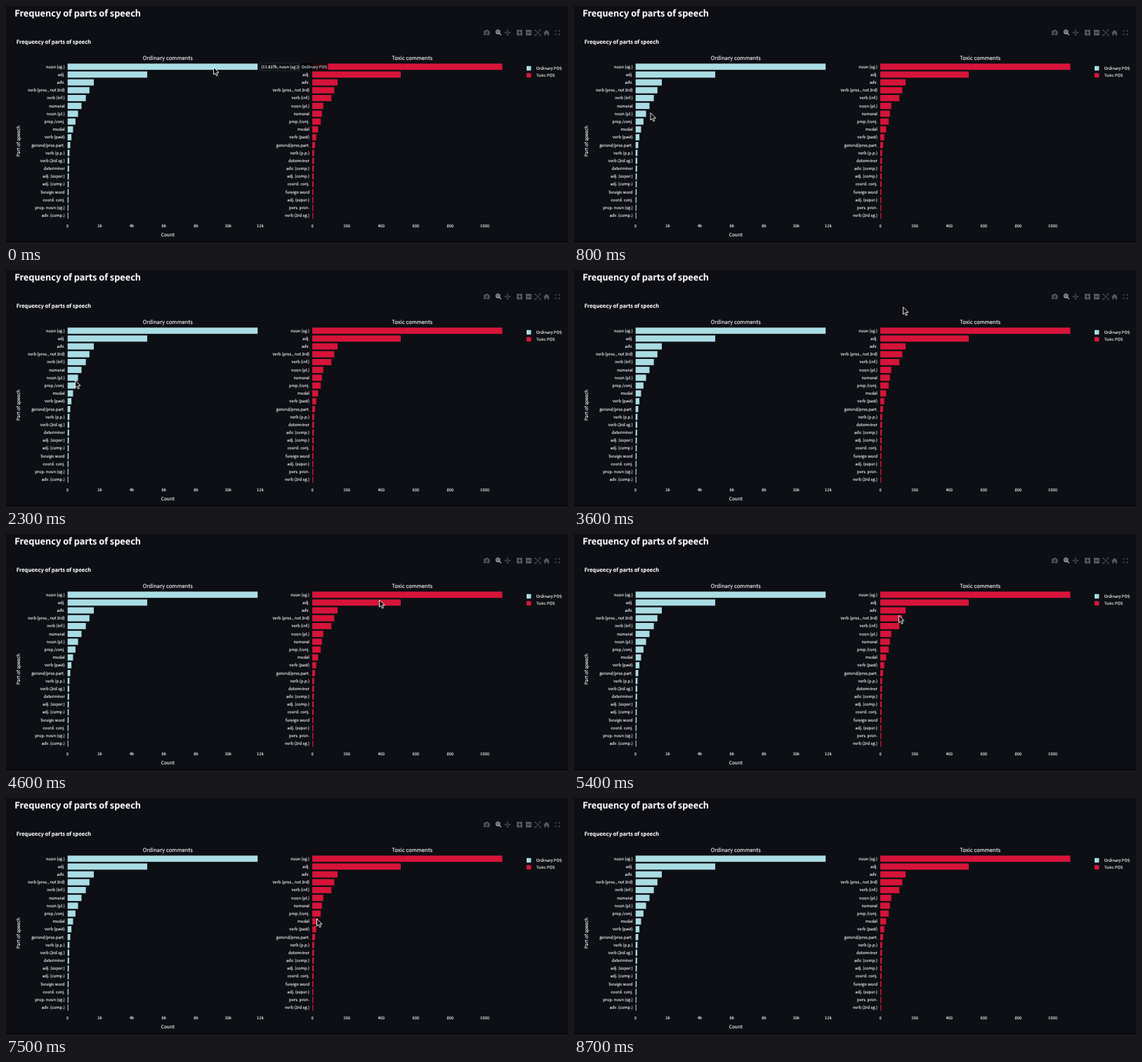
An HTML page for the animation above (9.3 s loop, 800 px wide and 337 px high).

```html
<!DOCTYPE html>
<html lang="en">
<head>
<meta charset="utf-8">
<title>Frequency of parts of speech</title>
<style>
  html, body { margin: 0; width: 100%; height: 100%; overflow: hidden; background: #0d0f14; }
  svg { display: block; width: 100%; height: 100%; }
  text {
    font: 5.77px "Noto Sans CJK JP", "Noto Sans CJK SC", "Open Sans", sans-serif;
    color: #fafafa; fill: currentColor; stroke: currentColor; stroke-width: .12;
    text-rendering: geometricPrecision;
  }
  .mid { text-anchor: middle; }
  .end { text-anchor: end; }
  #tools { fill: none; stroke: #55575d; stroke-width: 1.1; }
  #tools .solid { fill: #55575d; stroke: none; }
  #tools .cut { stroke: #0d0f14; }
</style>
</head>
<body>
<svg id="stage" viewBox="0 0 800 337">
  <rect width="800" height="337" fill="#0d0f14"/>
  <rect y="336" width="800" height="1" fill="#000"/>
  <g id="chart"></g>
  <g id="tools">
    <path class="solid" d="M680 35.5h2l1-1.5h3l1 1.5h1.5v6H680z"/>
    <circle class="cut" cx="684.3" cy="38.2" r="1.5"/>
    <g stroke="#b9babe"><circle cx="700.3" cy="37" r="2.7"/><path d="M702.3 39l2.8 2.8M698.9 37h2.8M700.3 35.6v2.8"/></g>
    <path stroke-width=".9" d="M710 38h8M714 34v8M711.3 36.7L710 38l1.3 1.3M716.7 36.7L718 38l-1.3 1.3M712.7 35.3L714 34l1.3 1.3M712.7 40.7L714 42l1.3-1.3"/>
    <path class="solid" d="M727 34h8v8h-8zM740 34h8v8h-8z"/>
    <path class="cut" d="M728.5 38h5M731 35.5v5M741.5 38h5"/>
    <path stroke-width=".9" d="M753 36v-2h2M759 34h2v2M761 40v2h-2M755 42h-2v-2M754 35l6 6M760 35l-6 6"/>
    <path class="solid" d="M765 38.3l4.5-4.3 4.5 4.3h-1.2V42h-2.2v-2.5h-2.2V42h-2.2v-3.7z"/>
    <path stroke-width=".9" d="M782 37v-2h2M786 35h2v2M788 39v2h-2M784 41h-2v-2"/>
  </g>
  <g id="tip"></g>
  <path id="cursor" d="M0 0V10.5L2.4 8.3 4 12.2 5.8 11.4 4.2 7.6H7.5Z" fill="#000" stroke="#fff" stroke-width=".9"/>
</svg>
<script>
const $ = id => document.getElementById(id);
const BLUE = '#a9dce3', RED = '#d6143a', BG = '#0d0f14';
const TOP = 86.7, ROW = 11.19, BAR = 8.9, ROWS = 20;

function add(parent, tag, attrs, content = '') {
  const el = document.createElementNS('http://www.w3.org/2000/svg', tag);
  for (const k in attrs) el.setAttribute(k, attrs[k]);
  el.textContent = content;
  return parent.appendChild(el);
}
const label = (parent, x, y, str, cls = '', style = '') =>
  add(parent, 'text', { x, y, class: cls, style }, str);
const box = (parent, x, y, width, height, fill) =>
  add(parent, 'rect', { x, y, width, height, fill });

// Finds the stretch of ascending knots that holds v
function segment(knots, v) {
  const i = Math.max(1, knots.findIndex(k => k >= v));
  return [i, (v - knots[i - 1]) / (knots[i] - knots[i - 1])];
}

// Counts fall off geometrically between these rows
const KNOTS = [0, 1, 2, 4, 5, 7, 11, 19];
function count(peaks, row) {
  const [i, p] = segment(KNOTS, row);
  return peaks[i - 1] * (peaks[i] / peaks[i - 1]) ** p;
}

const chart = $('chart');

function barChart({ x0, scale, color, title, mid, names, peaks, step, last, format }) {
  label(chart, mid, 77.2, title, 'mid', 'font-size:7.65px');
  names.split('|').forEach((name, row) => {
    const y = TOP + row * ROW;
    label(chart, x0 - 4, y + 1.9, name, 'end');
    box(chart, x0, y - BAR / 2, count(peaks, row) * scale, BAR, color);
  });
  for (let n = 0; n <= last; n += step) label(chart, x0 + n * scale, 316, format(n), 'mid');
}

label(chart, 12.3, 15.2, 'Frequency of parts of speech', '', 'font-size:12.75px;font-weight:700');
label(chart, 14.8, 54, 'Frequency of parts of speech', '', 'font-size:7.54px;font-weight:700');
label(chart, 230.3, 328.8, 'Count', 'mid', 'font-size:6.7px');
label(chart, 0, 0, 'Part of speech', 'mid', 'font-size:6.75px')
  .setAttribute('transform', 'translate(20 193) rotate(-90)');

const common = 'noun (sg.)|adj.|adv.|verb (pres., not 3rd)|verb (inf.)|';
const middle = 'prep./conj.|modal|verb (past)|gerund/pres.part.|verb (p.p.)|';

barChart({
  x0: 87.7, scale: 0.02285, color: BLUE, title: 'Ordinary comments', mid: 230.3,
  names: common + 'numeral|noun (pl.)|' + middle +
    'verb (3rd sg.)|determiner|adj. (super.)|adj. (comp.)|foreign word|coord. conj.|prop. noun (sg.)|adv. (comp.)',
  peaks: [11837, 4960, 1631, 1137, 865, 490, 115, 45],
  step: 2000, last: 12000, format: n => n ? n / 1000 + 'k' : '0'
});
barChart({
  x0: 436, scale: 0.2455, color: RED, title: 'Toxic comments', mid: 578.2,
  names: common + 'noun (pl.)|numeral|' + middle +
    'determiner|adv. (comp.)|adj. (comp.)|coord. conj.|foreign word|adj. (super.)|pers. pron.|verb (3rd sg.)',
  peaks: [1102, 513, 147, 111, 64, 49, 11, 5],
  step: 200, last: 1000, format: n => n
});
[['Ordinary POS', BLUE, 89], ['Toxic POS', RED, 99]].forEach(([name, color, y]) => {
  box(chart, 741, y - 3.2, 6.4, 6.4, color);
  label(chart, 754.8, y + 2.1, name);
});

// Hover label pointing at a bar's end
function hover(x, row, str, width) {
  const g = add($('tip'), 'g'), y = TOP + row * ROW, left = x + 2.7, right = left + width;
  box(g, right, y - 5, 40, 10, 'rgba(0,0,0,.8)');
  add(g, 'path', {
    d: `M${x} ${y}L${left} ${y - 2.5}V${y - 5.5}H${right}V${y + 5.5}H${left}V${y + 2.5}Z`,
    fill: BG, stroke: '#33363f', 'stroke-width': .7
  });
  label(g, left + 2.2, y + 2, str);
  label(g, right + 2.2, y + 2, 'Ordinary POS', '', 'color:' + BLUE);
  return g;
}
const tips = [
  { el: hover(358.4, 0, '(11.837k, noun (sg.))', 57.2), from: 0, to: 100 },
  { el: hover(125, 2, '(1631, adv.)', 34), from: 1300, to: 1800 }
];

// Pointer stops: time, x, y
const stops = [
  [0, 295.5, 87.5], [100, 107, 200], [1500, 111, 105], [2300, 98.5, 157.5], [3200, 88, 211],
  [3600, 468.5, 52.8], [4600, 531.5, 94], [5200, 464, 111], [6100, 451.5, 152], [6700, 442.5, 172.5]
];
const times = stops.map(s => s[0]);
const LOOP = 9300, LEAVE = 8400, GONE = 8700;

function pointer(t) {
  const [i, p] = segment(times, Math.min(t, times.at(-1)));
  const ease = p * p * (3 - 2 * p);
  return [1, 2].map(k => stops[i - 1][k] + (stops[i][k] - stops[i - 1][k]) * ease);
}

const start = performance.now();
function draw(now) {
  const t = Math.floor(Math.max(0, now - start) % LOOP / 100) * 100;
  $('cursor').setAttribute('transform', `translate(${pointer(t)})`);
  $('cursor').style.display = t < LEAVE ? '' : 'none';
  $('tools').style.opacity = Math.min(1, Math.max(0, (GONE - t) / 400));
  for (const { el, from, to } of tips) el.style.display = t >= from && t < to ? '' : 'none';
  requestAnimationFrame(draw);
}
draw(start);
</script>
</body>
</html>
```
